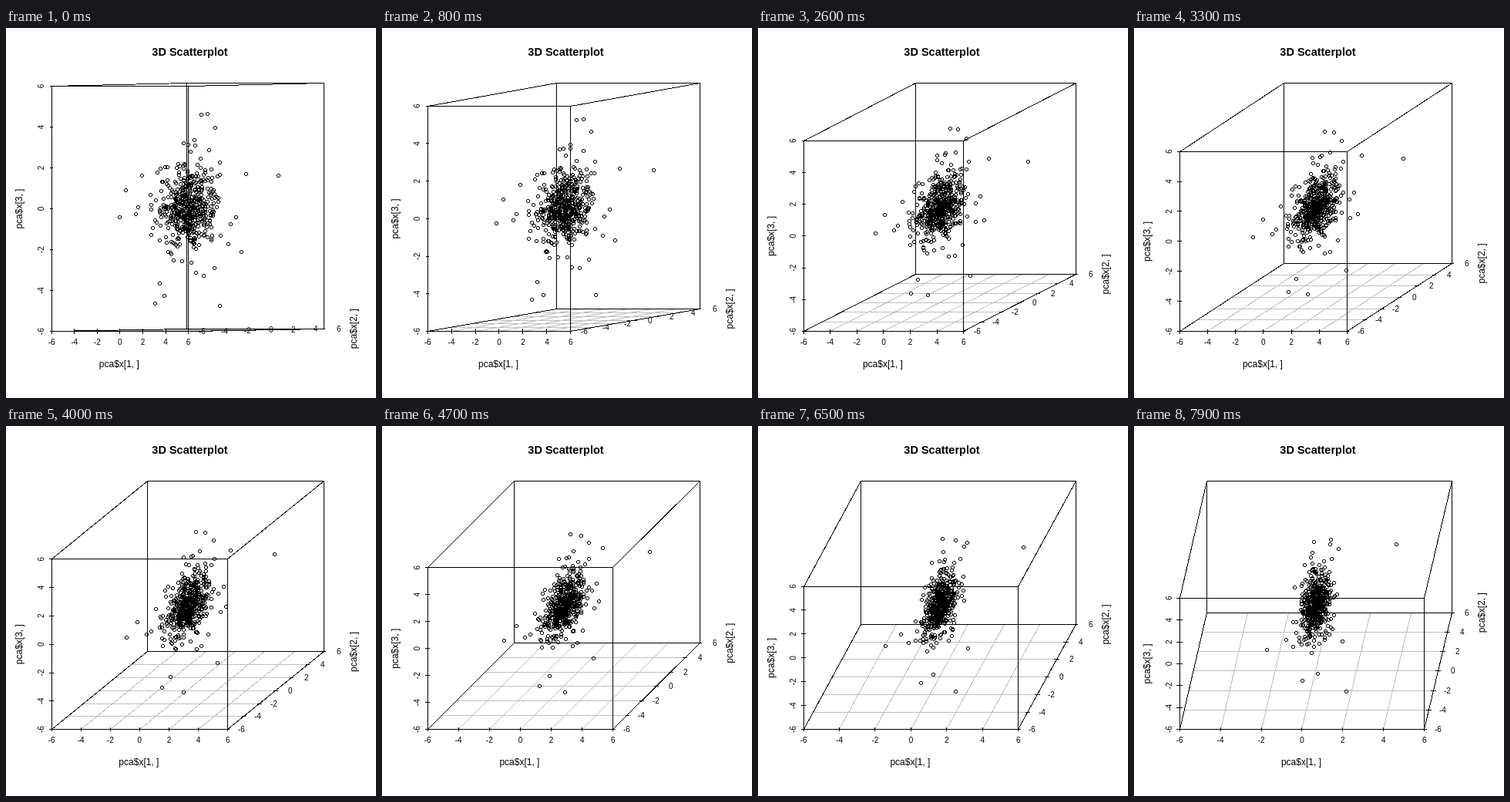
These frames come from a looping animation (480x480 px, 8 s). An HTML page:

```html
<!DOCTYPE html>
<html lang="en">
<head>
<meta charset="utf-8">
<title>3D Scatterplot</title>
<style>
  html, body { margin: 0; width: 100%; height: 100%; overflow: hidden; background: #fff; }
  svg { display: block; width: 100%; height: 100%; }
  path { fill: none; stroke: #000; stroke-width: 1; stroke-linecap: square; shape-rendering: crispEdges; }
  #grid { stroke: #bebebe; }
  text { font: 10px "Liberation Sans", Arial, sans-serif; white-space: pre; }
  .name { font-size: 12px; }
  .mid { text-anchor: middle; }
  .title { font-size: 14.5px; font-weight: bold; }
</style>
</head>
<body>
<svg id="stage" viewBox="0 0 480 480">
  <g transform="translate(.5 .5)">
    <path id="grid"/>
    <path id="box"/>
    <path id="ticks"/>
    <path id="dots"/>
  </g>
  <text class="mid title" x="238.5" y="36">3D Scatterplot</text>
</svg>
<script>
const STEP = 100, STEPS = 80, CORE = 500, HALO = 32;
const LEFT = 59.1, WIDTH = 353, BOTTOM = 393.7, HEIGHT = 321.8;
const stage = document.getElementById("stage");
const paths = {};
for (const id of ["grid", "box", "ticks", "dots"]) paths[id] = document.getElementById(id);

// Oblique projection of the unit cube; the depth axis swings with the angle.
function view(angle) {
  const yz = angle / 90, yx = 1 - yz;
  return {
    yx, yz,
    px: (x, y) => LEFT + WIDTH * (x + yx * y) / (1 + yx),
    py: (y, z) => BOTTOM - HEIGHT * (z + yz * y) / (1 + yz)
  };
}

// The farthest points: screen x and y at the first angle, screen x at the last.
const farthest = [
  [353, 191, 340], [311, 189, 255], [305, 290, 251], [277, 360, 270],
  [205, 347, 275], [199, 331, 238], [193, 357, 218], [147, 245, 172],
  [155, 210, 197], [168, 241, 206], [176, 191, 225], [253, 112, 233],
  [261, 111, 254], [271, 129, 265]
];

function locate([x0, y0, x1]) {
  const a = view(1), b = view(STEPS);
  const first = (x0 + 0.5 - LEFT) / WIDTH * (1 + a.yx);
  const last = (x1 + 0.5 - LEFT) / WIDTH * (1 + b.yx);
  const y = (first - last) / (a.yx - b.yx);
  return [first - a.yx * y, y, (BOTTOM - y0 - 0.5) / HEIGHT * (1 + a.yz) - a.yz * y];
}

let seed = 20717;
function random() {
  seed = (seed * 1664525 + 1013904223) % 4294967296;
  return (seed + 0.5) / 4294967296;
}
const normal = () => Math.sqrt(-2 * Math.log(random())) * Math.cos(2 * Math.PI * random());
const direction = () => [normal(), normal(), normal()];

const spread = [0.03, 0.108, 0.09];
const scatter = (d, size) => d.map((v, i) => 0.5 + v * size * spread[i]);
const points = farthest.map(locate);

// Dense centre, then a thin shell of strays around it.
while (points.length < farthest.length + CORE) {
  const d = direction(), size = 0.6 + 0.7 * random();
  if (Math.hypot(...d) * size < 2.6) points.push(scatter(d, size));
}
for (let i = 0; i < HALO; i++) {
  const d = direction();
  points.push(scatter(d, (2.5 + 0.9 * random()) / Math.hypot(...d)));
}

function label(content, className) {
  const el = document.createElementNS("http://www.w3.org/2000/svg", "text");
  el.textContent = content;
  el.setAttribute("class", className);
  stage.append(el);
  return el;
}
const place = (el, x, y, turn = 0) =>
  el.setAttribute("transform", `translate(${x} ${y}) rotate(${turn})`);

const values = Array.from({ length: 7 }, (_, i) => 2 * i - 6);
const xTicks = values.map(v => label(v, "mid"));
const yTicks = values.map(v => label(v, ""));
const zTicks = values.map(v => label(v, "mid"));
const [xName, yName, zName] = [1, 2, 3].map(i => label(`pca$x[${i}, ]`, "mid name"));

const line = (x0, y0, x1, y1) => "M" + [x0, y0, x1, y1].map(Math.floor).join(" ");
const ring = "m-1 -2h2l1 1v2l-1 1h-2l-1 -1v-2z";

function draw(angle) {
  const { yx, yz, px, py } = view(angle);
  const edge = (a, b) => line(px(a[0], a[1]), py(a[1], a[2]), px(b[0], b[1]), py(b[1], b[2]));
  const tickX = WIDTH / 100 / (1 + yx), tickZ = HEIGHT / 100 / (1 + yz);
  let grid = "", box = "", ticks = "";

  for (const a of [0, 1]) {
    for (const b of [0, 1]) {
      box += edge([0, a, b], [1, a, b]) + edge([a, 0, b], [a, 1, b]) + edge([a, b, 0], [a, b, 1]);
    }
  }

  values.forEach((v, i) => {
    const k = i / 6;
    grid += edge([k, 0, 0], [k, 1, 0]) + edge([0, k, 0], [1, k, 0]);
    const x = px(k, 0), z = py(0, k), dx = px(1, k), dy = py(k, 0);
    ticks += line(x, BOTTOM - tickZ, x, BOTTOM + tickZ)
      + line(LEFT - tickX, z, LEFT + tickX, z)
      + line(dx - tickX, dy, dx + tickX, dy);
    place(xTicks[i], x, 411);
    place(zTicks[i], 49, z, -90);
    place(yTicks[i], Math.floor(dx) + (v < 0 ? 14 : 17), Math.floor(dy) + 4);
  });

  paths.grid.setAttribute("d", grid);
  paths.box.setAttribute("d", box);
  paths.ticks.setAttribute("d", ticks);
  paths.dots.setAttribute("d", points.map(([x, y, z]) =>
    `M${Math.floor(px(x, y))} ${Math.floor(py(y, z))}${ring}`).join(""));

  place(xName, px(0.5, 0) - 1, 440);
  place(yName, 455, py(1, 0), -90);
  place(zName, 21, py(0, 0.5), -90);
}

let shown = -1;
const start = performance.now();
function tick() {
  const step = Math.floor((performance.now() - start) / STEP) % STEPS;
  if (step !== shown) {
    shown = step;
    draw(step + 1);
  }
  requestAnimationFrame(tick);
}
tick();
</script>
</body>
</html>
```
